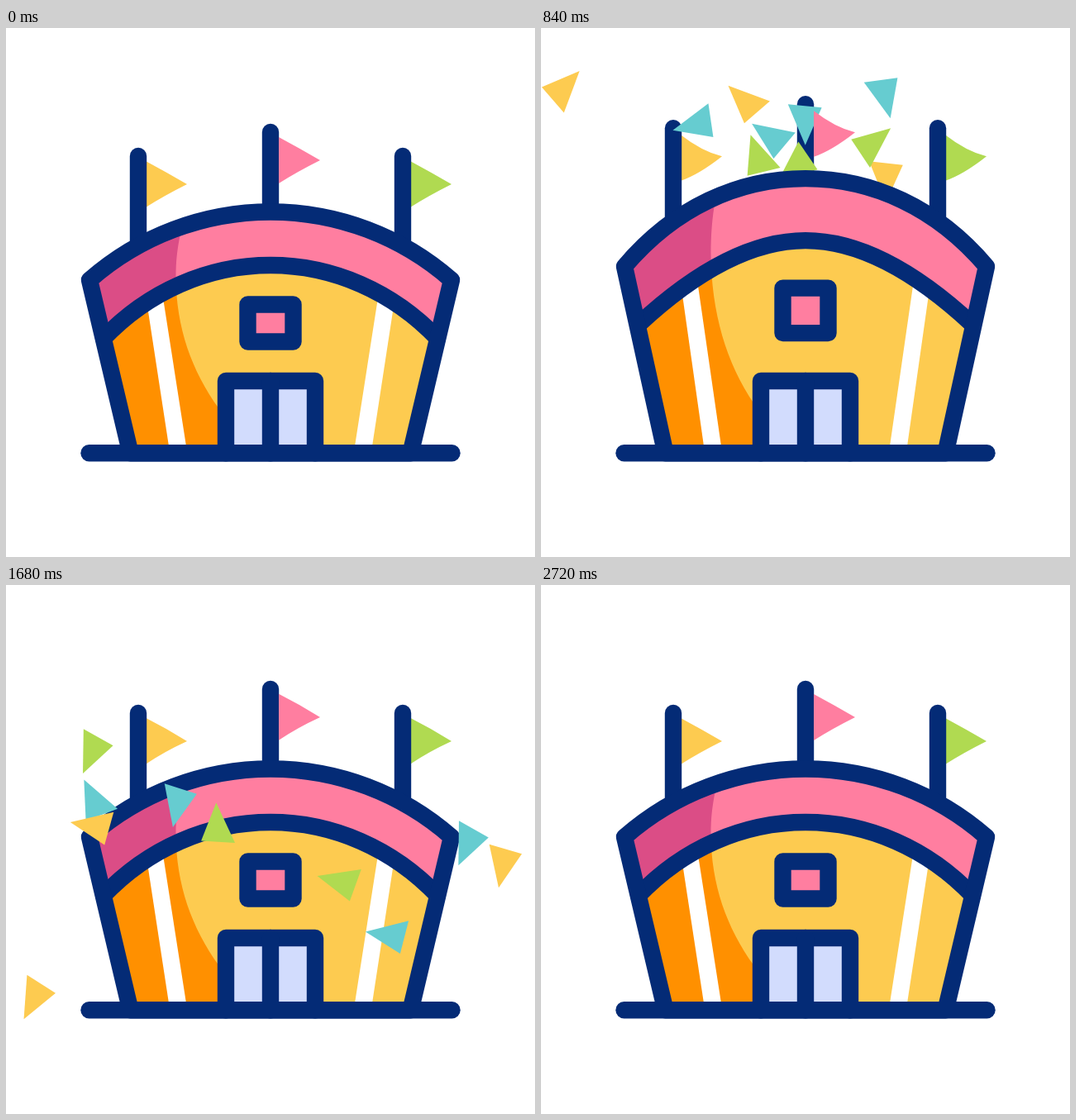
Write an HTML page with a canvas that moves like this. It is 640x640 px and loops after 2920 ms.

```html
<!DOCTYPE html>
<html lang="en">
<head>
<meta charset="utf-8">
<title>Stadium confetti</title>
<style>
html, body { margin: 0; width: 100%; height: 100%; overflow: hidden; background: #fff; }
canvas { display: block; width: 640px; height: 640px; }
</style>
</head>
<body>
<canvas id="stage" width="640" height="640"></canvas>
<script>
const ctx = document.getElementById('stage').getContext('2d');
const LOOP = 2920, STEP = 40;
const NAVY = '#042b76', PINK = '#ff7ea0', ROSE = '#db4d86', YELLOW = '#fdcb50',
      ORANGE = '#ff9000', GREEN = '#b0da51', TEAL = '#66ccd0', GLASS = '#d2dcfd';
const BASE = 514.3, BURST = 640, HIGH = 1160, LOW = 1840, END = 2400;

// Heights of the building: rest, shift when squashed, shift when leaping
const PARTS = {
  corner: [305, 12, -17],
  roofBend: [251.8, 27, -36],
  roof: [222.5, 7, -39.5],
  eaveEnd: [375.5, 10, -17],
  eaveBend: [319, 14, -11],
  eave: [287, 9, -29.5],
  winTop: [334.5, 2.5, -19.3],
  winBottom: [379.5, -2, -9.8],
  lift: [0, 16, -34]
};

// Each piece: colour, time of its peak, pose [x, y, angle] at HIGH and at LOW
const CONFETTI = [
  [TEAL, 1000, [101, 90, 15], [111, 328, 78]],
  [TEAL, 1130, [212, 50, -9], [207, 356, -100]],
  [YELLOW, 850, [28, 170, 58], [38, 607, -101]],
  [YELLOW, 1120, [129, -9, 30], [103, 423, 3]],
  [YELLOW, 1120, [584, 124, -86], [607, 427, -78]],
  [GREEN, 1283, [55, 60, 18], [121, 307, -93]],
  [GREEN, 1188, [291, 81, -129], [245, 405, -317]],
  [GREEN, 1060, [477, 97, -131], [386, 463, 58]],
  [TEAL, 960, [360, 124, -53], [499, 531, 27]],
  [TEAL, 1120, [575, -28, -90], [555, 457, -60]]
];

const mix = (a, b, k) => a + (b - a) * k;
const wave = k => (1 - Math.cos(Math.PI * Math.min(Math.max(k, 0), 1))) / 2;
const ramp = (t, from, to) => wave((t - from) / (to - from));

const squashAt = t => ramp(t, 0, 600) - ramp(t, 600, 900);
const leapAt = t => 1.15 * (ramp(t, 600, 900) - ramp(t, 900, 1200));

// Flags bend once, then flutter with a fading swing
function curlAt(t) {
  if (t < 600) return ramp(t, 0, 600);
  const fade = Math.min(1, 1.2 * Math.max(0, 1 - (t - 600) / 1560));
  return fade * Math.cos(Math.PI * (t - 600) / 300);
}

// Shoots up from behind the roof, slows to its peak, then drops to a steady speed
function flight(peak, high, low, t) {
  const drop = s => Math.hypot(s - peak, 300);
  const along = s => (s - HIGH) / (LOW - HIGH);
  const fallen = s => (drop(s) - drop(HIGH)) / (drop(LOW) - drop(HIGH));
  const s = Math.max(t, peak);
  let x = mix(high[0], low[0], along(s));
  let y = mix(high[1], low[1], fallen(s)) + 4e-4 * Math.max(0, t - LOW) ** 2;
  if (t < peak) {
    const k = (t - BURST) / (peak - BURST);
    x = mix(320, x, wave(k));
    y = mix(290, y, k * (2 - k));
  }
  return [x, y, mix(high[2], low[2], along(t))];
}

function poly(color, ...pts) {
  ctx.fillStyle = color;
  ctx.beginPath();
  for (let i = 0; i < pts.length; i += 2) ctx.lineTo(pts[i], pts[i + 1]);
  ctx.closePath();
  ctx.fill();
}

function line(...pts) {
  ctx.beginPath();
  for (let i = 0; i < pts.length; i += 2) ctx.lineTo(pts[i], pts[i + 1]);
  ctx.stroke();
}

function clipped(path, paint) {
  ctx.save();
  ctx.clip(path);
  paint();
  ctx.restore();
}

function flag(color, x, cap, curl) {
  const top = cap + 6 - 2.5 * curl, tip = cap + 34, low = cap + 62 - 2 * curl;
  const bend = 9 * curl;
  ctx.fillStyle = color;
  ctx.beginPath();
  ctx.moveTo(x - 1, top);
  ctx.quadraticCurveTo(x + 25, (top + tip) / 2 - bend, x + 49, tip);
  ctx.quadraticCurveTo(x + 21, (low + tip) / 2 - bend, x - 1, low);
  ctx.fill();
}

function confetti(t) {
  if (t < BURST || t >= END) return;
  for (const [color, peak, high, low] of CONFETTI) {
    const [x, y, angle] = flight(peak, high, low, t);
    ctx.save();
    ctx.translate(x, y);
    ctx.rotate(angle * Math.PI / 180);
    poly(color, -31.7, 0, 18.1, -20.4, 13.6, 20.4);
    ctx.restore();
  }
}

function building(p) {
  const roof = `C161.5 ${p.roofBend} 239.4 ${p.roof} 320 ${p.roof}`
    + `S478.5 ${p.roofBend} 539 ${p.corner}`;
  const eave = `M118 ${p.eaveEnd}C171.7 ${p.eaveBend} 244.3 ${p.eave} 320 ${p.eave}`
    + `S468.3 ${p.eaveBend} 522 ${p.eaveEnd}`;
  const floor = `L489.5 ${BASE}H150.5Z`;
  const outline = new Path2D(`M150.5 ${BASE}L101 ${p.corner}${roof}${floor}`);
  const wall = new Path2D(eave + floor);
  const shift = p.eave - 287;
  const shade = new Path2D(`M80 ${p.roof}H214L211 ${p.roof + 26}`
    + `C207 ${p.roof + 46} 205.5 ${282 + shift} 205.5 ${302 + shift}`
    + `C206 ${362 + shift * .6} 224 ${414 + shift * .3} 258 ${461 + shift * .2}V${BASE}H80Z`);

  ctx.fillStyle = PINK;
  ctx.fill(outline);
  clipped(outline, () => {
    ctx.fillStyle = ROSE;
    ctx.fill(shade);
  });
  ctx.fillStyle = YELLOW;
  ctx.fill(wall);
  clipped(wall, () => {
    ctx.fillStyle = ORANGE;
    ctx.fill(shade);
    const y = 320 + shift / 2;
    poly('#fff', 168.5, y, 189, y, 218, 506, 197, 506);
    poly('#fff', 471.5, y, 451, y, 422, 506, 443, 506);
  });

  ctx.stroke(new Path2D(eave));
  ctx.stroke(outline);

  ctx.fillStyle = PINK;
  ctx.beginPath();
  ctx.rect(292.5, p.winTop, 55, p.winBottom - p.winTop);
  ctx.fill();
  ctx.stroke();

  ctx.fillStyle = GLASS;
  ctx.fillRect(266, 427, 108, BASE - 427);
  line(266, BASE, 266, 427, 374, 427, 374, BASE);
  line(320, 427, 320, BASE);
  line(100.5, BASE, 539.5, BASE);
}

function draw(t) {
  const squash = squashAt(t), leap = leapAt(t), curl = curlAt(t);
  const p = {};
  for (const k in PARTS) {
    const [rest, down, up] = PARTS[k];
    p[k] = rest + down * squash + up * leap;
  }
  const rising = t < 1000;
  const side = 155 + p.lift, mid = 126 + p.lift;

  ctx.fillStyle = '#fff';
  ctx.fillRect(0, 0, 640, 640);
  ctx.strokeStyle = NAVY;
  ctx.lineWidth = 20.4;
  ctx.lineCap = ctx.lineJoin = 'round';

  flag(YELLOW, 170, side, curl);
  flag(GREEN, 490, side, curl);
  line(160, side, 160, side + 107);
  line(480, side, 480, side + 107);
  line(320, mid, 320, mid + 96);
  // Pieces leave from behind the roof and fall in front of it
  if (rising) confetti(t);
  flag(PINK, 331, mid, curl);
  building(p);
  if (!rising) confetti(t);
}

function tick() {
  const t = performance.now() % LOOP;
  draw(Math.floor(t / STEP) * STEP);
  requestAnimationFrame(tick);
}
tick();
</script>
</body>
</html>
```
